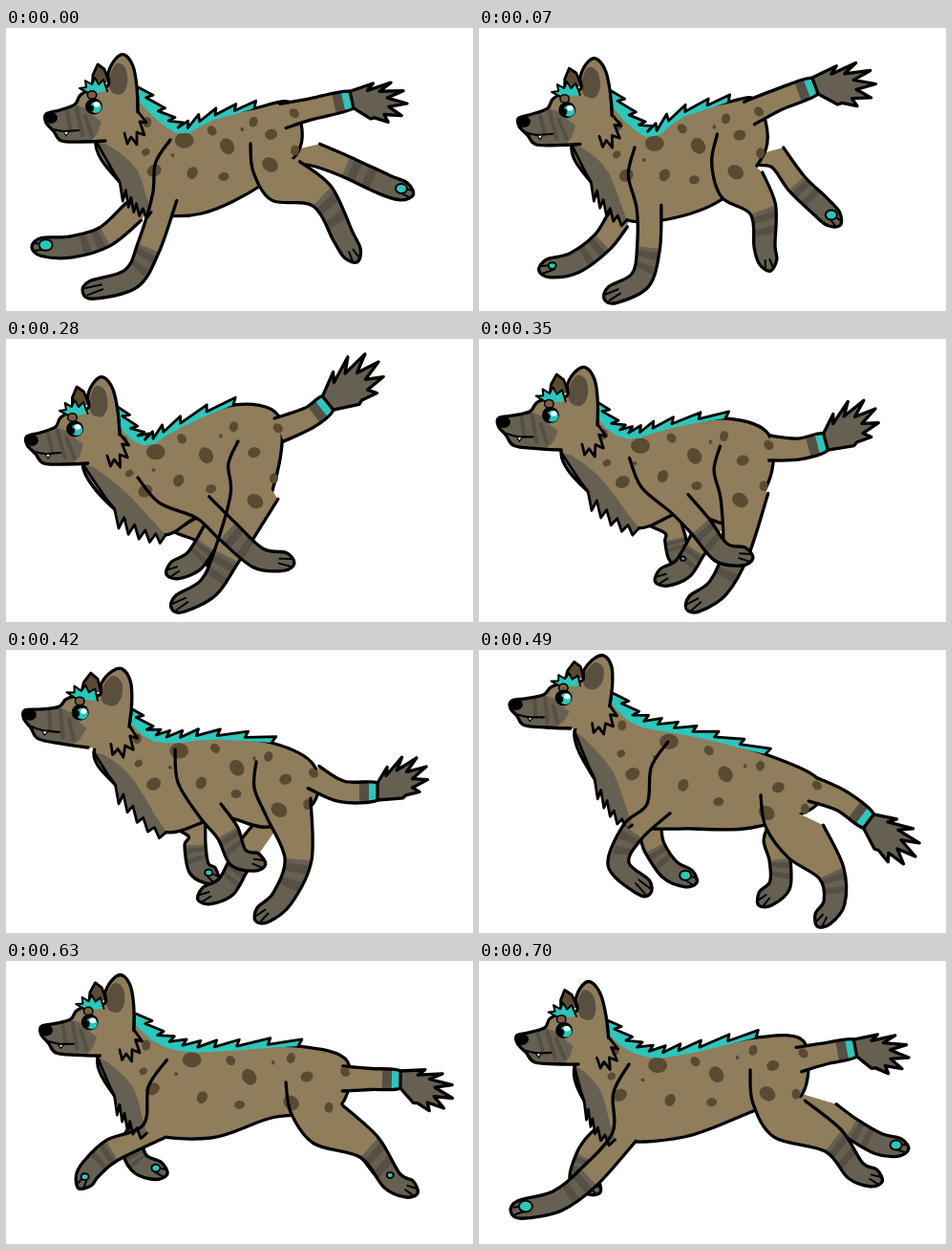
An HTML page with a canvas that plays this animation: 489x296 px, repeating every 770 ms.

```html
<!DOCTYPE html>
<html lang="en">
<head>
<meta charset="utf-8">
<title>Running hyena</title>
<style>
html, body { margin: 0; width: 100%; height: 100%; overflow: hidden; background: #fff; }
canvas { display: block; }
</style>
</head>
<body>
<canvas id="stage" width="489" height="296"></canvas>
<script>
const ctx = document.getElementById('stage').getContext('2d');
const FUR = '#8f7d5c', SPOT = '#5b4a32', GREY = '#666052', BAND = '#564f43',
      CYAN = '#2cc6bb', INK = '#000';
const STEP = 70, COUNT = 11;

// head: nose, ear tip, jaw. back and belly run from neck to rump. tail: axis and tuft tip.
// Legs are joints ending at the toes; near legs begin where their contour begins.
// pads: radius on the far front, far hind and near front paw.
const poses = [
  { at: 0, head: '48,94 124,28 104,118', pads: '6,5,0',
    back: '134,64 160,92 185,108 215,94 260,84 300,79',
    belly: '94,118 122,165 150,192 205,194 268,164 308,125',
    tail: '290,92 318,85 362,75 420,79',
    farFront: '134,192 104,218 68,229 37,229', farHind: '326,133 356,145 397,164 417,171',
    front: '172,117 166,178 149,230 131,262 90,274', hind: '256,121 293,160 331,176 353,218 363,236' },
  { at: 2, head: '48,102 121,36 108,125', pads: '0,5,0',
    back: '132,70 155,100 178,115 208,88 262,71 282,74',
    belly: '100,126 118,165 155,208 205,203 250,188 293,128',
    tail: '276,86 306,66 342,46 411,38',
    farFront: '157,210 154,230 132,262 108,274', farHind: '300,138 309,180 317,208 325,228',
    front: '154,133 190,196 206,229 207,265 190,284', hind: '243,101 258,168 264,204 245,238 242,253' },
  { at: 4, head: '28,106 102,40 86,130', pads: '0,0,0',
    back: '112,72 130,98 150,108 178,92 238,69 285,80',
    belly: '80,130 118,182 165,205 205,186 256,200 284,140',
    tail: '286,95 318,82 337,67 390,24',
    farFront: '204,200 213,214 215,222 215,230', farHind: '222,195 209,215 196,233 177,242',
    front: '138,145 206,176 232,201 264,229 292,233', hind: '243,107 260,165 231,227 212,260 182,277' },
  { at: 6, head: '26,68 122,20 86,102', pads: '3,0,0',
    back: '125,62 148,88 175,94 215,91 278,97 322,120',
    belly: '92,107 118,145 165,190 225,175 275,185 322,160',
    tail: '322,133 352,148 389,148 440,122',
    farFront: '200,187 198,204 202,228 214,236', farHind: '256,205 243,226 230,248 210,257',
    front: '177,104 214,168 232,191 243,217 262,222', hind: '262,117 296,165 306,219 289,260 269,277' },
  { at: 7, head: '40,57 131,6 96,82', pads: '5,0,0',
    back: '138,48 162,73 195,82 240,91 300,109 355,135',
    belly: '100,85 124,140 158,182 225,187 285,186 350,165',
    tail: '350,146 380,158 408,179 457,216',
    farFront: '180,192 184,207 200,230 219,239', farHind: '310,200 315,219 315,246 300,260',
    front: '198,96 188,166 161,190 146,224 172,248', hind: '295,152 342,200 369,233 372,264 360,281' },
  { at: 8, head: '40,63 127,8 93,90', pads: '7,0,0',
    back: '137,52 165,77 200,86 245,89 322,98 375,126',
    belly: '92,92 120,140 150,172 215,186 270,171 355,170',
    tail: '370,143 402,150 432,157 485,186',
    farFront: '145,185 155,194 178,201 200,203', farHind: '352,190 363,211 372,243 367,260',
    front: '180,99 158,172 107,170 96,184 120,199', hind: '302,140 350,177 390,202 414,240 431,250' },
  { at: 10, head: '46,82 117,22 104,108', pads: '0,5,6',
    back: '130,64 155,88 185,98 225,93 290,80 340,84',
    belly: '100,110 112,150 140,186 215,184 290,156 338,140',
    tail: '335,103 362,97 394,91 450,101',
    farFront: '124,190 112,206 106,226 119,236', farHind: '368,160 390,175 418,191 440,195',
    front: '157,108 152,184 115,226 82,251 43,260', hind: '284,114 325,165 371,188 394,219 413,227' }
];

const parse = s => s.split(' ').map(p => p.split(',').map(Number));
const mix = (a, b, t) => a.map((v, i) => v + (b[i] - v) * t);

// Spots sit at u along the trunk, v from back to belly.
const spots = parse('.44,.12,9 .68,.36,8 .54,.54,6 .67,.68,5 .61,.14,5 .79,.17,5 .86,.42,6 1,.22,5 ' +
  '.16,.17,5 .33,.55,7 .84,.82,8 .96,.95,5 .23,.46,4 .4,.3,2 .74,.22,2');

function poseAt(step) {
  const a = poses.filter(p => p.at <= step).pop();
  const b = poses.find(p => p.at >= step);
  const t = a === b ? 0 : (step - a.at) / (b.at - a.at);
  const pose = {};
  for (const part in a) {
    if (part === 'at') continue;
    const to = parse(b[part]);
    pose[part] = parse(a[part]).map((p, i) => mix(p, to[i], t));
  }
  return pose;
}

// Smooth curve through points a..b, with tangents from the whole list.
function curve(p, a = 0, b = p.length - 1) {
  ctx.beginPath();
  ctx.moveTo(...p[a]);
  for (let i = a; i < b; i++) {
    const p0 = p[i - 1] || p[i], p1 = p[i], p2 = p[i + 1], p3 = p[i + 2] || p2;
    ctx.bezierCurveTo(
      p1[0] + (p2[0] - p0[0]) / 6, p1[1] + (p2[1] - p0[1]) / 6,
      p2[0] - (p3[0] - p1[0]) / 6, p2[1] - (p3[1] - p1[1]) / 6, ...p2);
  }
}
function loop(p) {
  curve([p[p.length - 1], ...p, p[0], p[1]], 1, p.length + 1);
}
function poly(p) {
  ctx.beginPath();
  p.forEach(q => ctx.lineTo(...q));
}
function fill(color) {
  ctx.fillStyle = color;
  ctx.fill();
}
function line(width = 3.3, color = INK) {
  ctx.lineWidth = width;
  ctx.strokeStyle = color;
  ctx.stroke();
}
function oval(x, y, rx, ry, color, turn = 0) {
  ctx.beginPath();
  ctx.ellipse(x, y, rx, ry, turn, 0, 7);
  fill(color);
}

// Point on the same smooth curve at t in 0..1.
function along(p, t) {
  const u = Math.min(t, 1) * (p.length - 1), i = Math.min(Math.floor(u), p.length - 2), f = u - i;
  const p0 = p[i - 1] || p[i], p1 = p[i], p2 = p[i + 1], p3 = p[i + 2] || p2;
  return p1.map((v, k) => v + .5 * f * (p2[k] - p0[k] +
    f * (2 * p0[k] - 5 * v + 4 * p2[k] - p3[k] + f * (3 * (v - p2[k]) + p3[k] - p0[k]))));
}
// Point beside q: k ahead in the direction a to b, h to its right-hand side.
function beside(q, a, b, h, k = 0) {
  const dx = b[0] - a[0], dy = b[1] - a[1], d = Math.hypot(dx, dy) || 1;
  return [q[0] + (dx * k - dy * h) / d, q[1] + (dy * k + dx * h) / d];
}
// Both sides of a jointed axis, given the half width at each joint.
function sides(p, widths) {
  const side = s => p.map((q, i) => beside(q, p[i - 1] || q, p[i + 1] || q, s * widths[i]));
  return [side(1), side(-1)];
}

function legShape(joints, thigh, shin) {
  const [a, b] = sides(joints, [0, thigh, shin, 11, 9.5]);
  const bulge = Math.hypot(a[1][0] - a[0][0], a[1][1] - a[0][1]) * .12;
  const tip = beside(joints[4], joints[3], joints[4], 0, 10);
  return [a[0], beside(mix(a[0], a[1], .45), a[0], a[1], bulge), ...a.slice(1),
    tip, ...b.slice(1).reverse()];
}
function legFur(p) {
  curve(p);
  fill(FUR);
}
function legTrim(p) {
  ctx.save();
  curve(p);
  ctx.clip();
  curve(p, 3, 9);
  fill(GREY);
  for (const t of [.12, .5]) {
    poly([mix(p[3], p[4], t), mix(p[3], p[4], t + .2), mix(p[9], p[8], t + .2), mix(p[9], p[8], t)]);
    fill(BAND);
  }
  ctx.restore();
  const heel = mix(p[4], p[8], .5);
  for (const side of [p[5], p[7]]) {
    const toe = mix(p[6], side, .4);
    poly([toe, mix(toe, heel, .35)]);
    line(2);
  }
  curve(p);
  line();
}

function drawTail(joints) {
  const axis = joints.slice(0, 3), [mid, end, tip] = joints.slice(1);
  const [a, b] = sides(axis, [13, 11, 9]);
  const shape = [...a, ...b.reverse()];
  curve(shape);
  fill(FUR);
  ctx.save();
  ctx.clip();
  for (const [from, color] of [[19, BAND], [9, CYAN]]) {
    poly([beside(end, mid, end, 0, -from), beside(end, mid, end, 0, 10 - from)]);
    ctx.lineCap = 'butt';
    line(40, color);
  }
  ctx.restore();
  curve(shape, 0, 2);
  line();
  curve(shape, 3, 5);
  line();

  const size = Math.hypot(tip[0] - end[0], tip[1] - end[1]), tuft = [shape[3]];
  const ray = (turn, r) => beside(end, end, tip, Math.sin(turn) * r, Math.cos(turn) * r);
  for (let k = -3; k <= 3; k++) {
    const turn = k * .24, reach = size * (1 - turn * turn);
    tuft.push(ray(turn, reach));
    if (k < 3) tuft.push(ray(turn + .12, reach * .68));
  }
  poly([...tuft.reverse(), ...tuft.slice(-1), shape[2]].reverse());
  ctx.closePath();
  fill(GREY);
  line();
}

function drawMane(back) {
  const teeth = 9, end = .8, top = [], under = [];
  const lift = (t, h, k = 0) =>
    beside(along(back, t * end), along(back, Math.max(0, t - .04) * end), along(back, (t + .04) * end), -h, k);
  for (let i = 0; i < teeth; i++) {
    const t = i / teeth;
    top.push(lift(t, 4 - 3 * t), lift((i + 1) / teeth, 11 - 4 * t, 3));
    under.unshift(lift(t, -5 + 3 * t));
  }
  top.push(along(back, end));
  poly([...top, ...under]);
  fill(CYAN);
  poly(top);
  line(2.8);
}

// Smooth throat, then hanging spikes; the grey reaches a little into the body.
function drawChest(belly, back) {
  const edge = [0, .07, .14].map(t => along(belly, t)), inner = [];
  for (let i = 0; i < 5; i++) {
    const t = .18 + i * .046, [x, y] = along(belly, t + .015);
    edge.push(along(belly, t), [x + 1, y + 17 - 2 * i]);
  }
  edge.push(along(belly, .41));
  for (let t = .36; t > 0; t -= .06)
    inner.push(mix(along(belly, t), along(back, t), .3 * Math.sin(t * 7.5)));
  poly([...edge, ...inner]);
  fill(GREY);
  poly(edge);
  line(2.8);
}

// The head is drawn once and carried by its three anchors.
const skull = parse('138,88 137,62 133,40 124,28 115,32 107,47 107,60 92,63 78,70 72,80 56,86 42,90 42,99 50,108 58,118 80,119 104,118 125,115 136,105');
const muzzle = parse('43,90 56,86 72,80 84,84 92,92 100,98 96,110 90,118 58,118 50,108 42,99');
const cheek = parse('138,72 138,87 147,99 140,98 145,112 137,109 137,122 131,114 127,121 124,110');
const innerEar = parse('110,66 109,50 116,37 125,42 127,58 121,69');
const farEar = parse('90,64 91,49 96,38 103,43 108,56');
const hair = parse('106,66 102,54 97,59 93,52 90,59 83,55 84,62 77,63 88,69');
const stripes = ['64,87 68,108', '74,84 80,112', '83,92 90,112'].map(parse);
const mouth = parse('50,106 60,108 76,107');
const fang = parse('60,108 63,113 66,108');

function drawHead([nose, ear, jaw]) {
  const place = ([x, y]) => {
    const dx = x - 48, dy = y - 94;
    const a = (dx * 24 - dy * 56) / 5520, b = (76 * dy + 66 * dx) / 5520;
    return [0, 1].map(k => nose[k] + a * (ear[k] - nose[k]) + b * (jaw[k] - nose[k]));
  };
  const put = list => list.map(place);
  const dot = (x, y, rx, ry, color) => oval(...place([x, y]), rx, ry, color);

  poly(put(farEar));
  fill(SPOT);
  line(2.8);
  loop(put(skull));
  fill(FUR);
  poly(put(cheek));
  fill(FUR);
  line(2.8);
  loop(put(innerEar));
  fill('#5a4e3f');
  ctx.save();
  loop(put(skull));
  ctx.clip();
  poly(put(muzzle));
  fill(GREY);
  for (const s of stripes) {
    poly(put(s));
    line(4, BAND);
  }
  ctx.restore();
  curve(put(skull), 0, 16);
  line();
  poly(put(hair));
  fill(CYAN);
  line(2);
  dot(90, 70, 5.5, 5, INK);
  dot(90, 70, 4, 3.5, '#7a5f3f');
  dot(92, 82, 9, 8.5, INK);
  dot(94, 83, 6, 6, CYAN);
  dot(89, 84, 3, 3.5, INK);
  dot(95, 80, 3.2, 2.8, '#fff');
  dot(47, 94, 7, 6, INK);
  poly(put(fang));
  fill('#fff');
  line(1.2);
  curve(put(mouth));
  line(2.2);
}

function draw({ head, back, belly, tail, farFront, farHind, front, hind, pads }) {
  const root = t => mix(along(belly, t), along(back, t), .2);
  const nearHind = legShape(hind, 25, 14), nearFront = legShape(front, 13, 12);
  ctx.fillStyle = '#fff';
  ctx.fillRect(0, 0, 489, 296);
  for (const leg of [[root(.4), ...farFront], [root(.9), ...farHind]]) {
    const shape = legShape(leg, 12, 11);
    legFur(shape);
    legTrim(shape);
  }
  loop([...back, ...belly.slice().reverse()]);
  fill(FUR);
  line();
  drawTail(tail);
  legFur(nearHind);
  legFur(nearFront);
  spots.forEach(([u, v, r], i) =>
    oval(...mix(along(back, u), along(belly, u), v), r * 1.1, r * .9, SPOT, i));
  drawChest(belly, back);
  legTrim(nearHind);
  legTrim(nearFront);
  [farFront, farHind, front].forEach((leg, i) => {
    const r = pads[0][i], [ankle, toe] = leg.slice(-2), [x, y] = mix(toe, ankle, .15);
    if (r < 1) return;
    oval(x, y - 2, r + 2, r * .8 + 2, INK);
    oval(x, y - 2, r, r * .8, CYAN);
  });
  drawMane(back);
  drawHead(head);
}

ctx.lineJoin = ctx.lineCap = 'round';
const cycle = Array.from({ length: COUNT }, (_, i) => poseAt(i));
const start = performance.now();
let shown = -1;
function tick() {
  const step = Math.floor((performance.now() - start) / STEP) % COUNT;
  if (step !== shown) draw(cycle[shown = step]);
  requestAnimationFrame(tick);
}
tick();
</script>
</body>
</html>
```
